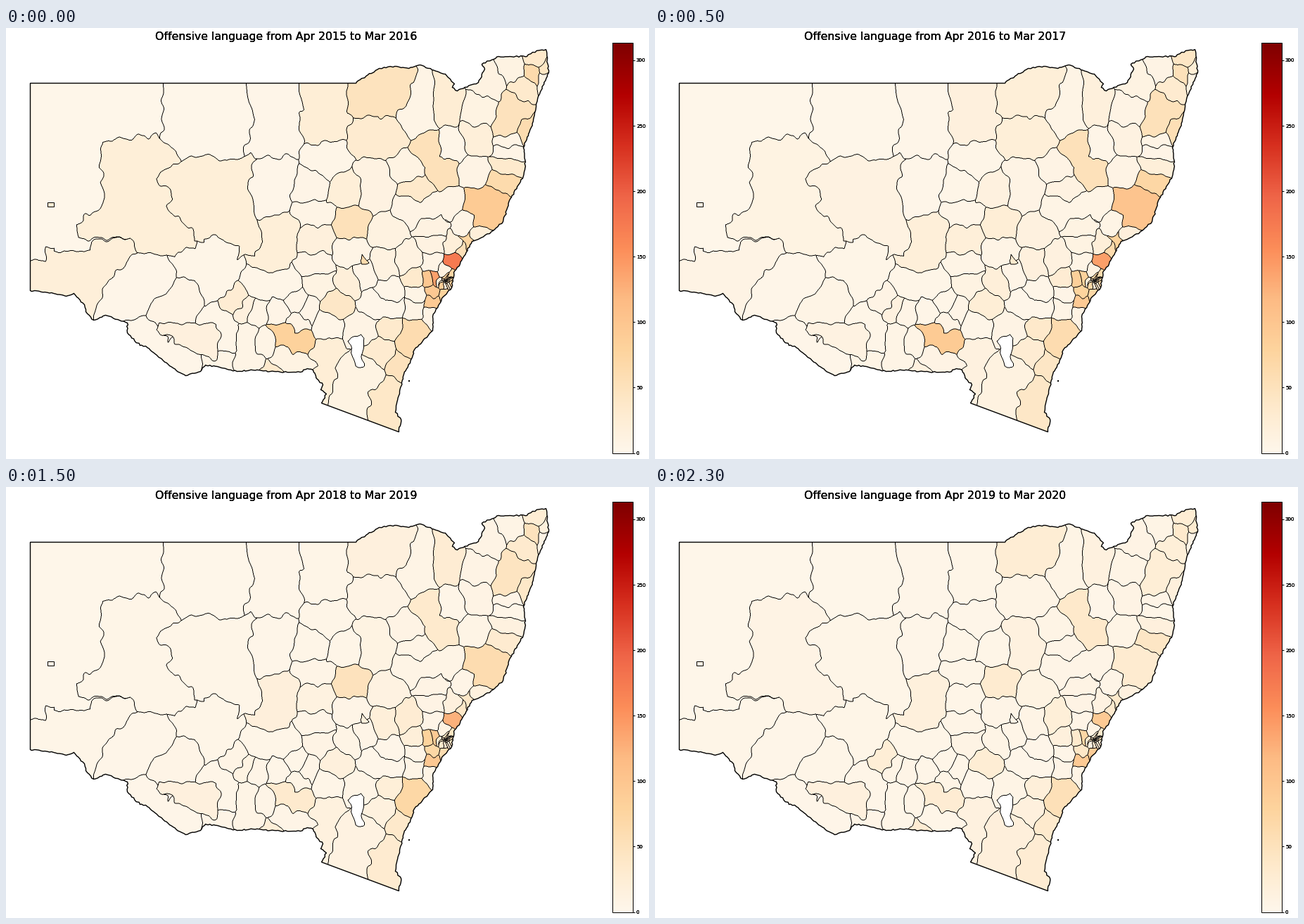
Write a matplotlib script that moves like this. It is 914 px wide and 613 px high and loops after 2.5 s.

```python
import math
import random

import matplotlib.pyplot as plt
import numpy as np
from matplotlib.animation import FuncAnimation
from matplotlib.patches import Polygon, Rectangle
from matplotlib.path import Path

W, H, DPI = 914, 613, 64
PX = 72 / DPI   # points per pixel
SS = 2          # supersampling of the district map
VMAX = 313.4
START, YEARS = 2015, 5
cmap = plt.get_cmap("OrRd")
rng = random.Random(4)

fig = plt.figure(figsize=(W / DPI, H / DPI), dpi=DPI, facecolor="white")
ax = fig.add_axes([0, 0, 1, 1])
ax.axis("off")


def pairs(nums):
    return list(zip(nums[::2], nums[1::2]))


def rough(pts, amp):
    """Chain of points with a fine random wiggle between them."""
    out = [pts[0]]
    for a, b in zip(pts, pts[1:]):
        n = max(1, round(math.dist(a, b) / 3))
        out += [(a[0] + (b[0] - a[0]) * k / n + rng.uniform(-amp, amp),
                 a[1] + (b[1] - a[1]) * k / n + rng.uniform(-amp, amp))
                for k in range(1, n)] + [b]
    return out


def wobble(x, y):
    """Smooth noise made of a few random waves."""
    total = 0
    for _ in range(6):
        length, angle = rng.uniform(9, 30), rng.uniform(0, 2 * math.pi)
        along = x * math.cos(angle) + y * math.sin(angle)
        total = total + .045 * length * np.sin(2 * math.pi * along / length)
    return total


# State outline: coast and rivers wiggle, two surveyed borders are straight
coast = rough(pairs((
    497, 78, 503, 73, 530, 57, 552, 54, 572, 57, 588, 52, 605, 59, 624, 65,
    637, 79, 634, 84, 641, 89, 671, 77, 680, 58, 676, 51, 700, 40, 740, 40,
    748, 34, 767, 30, 771, 63, 756, 97, 749, 132, 735, 170, 738, 190,
    735, 210, 716, 243, 706, 275, 687, 292, 662, 303, 645, 335, 636, 347,
    633, 369, 619, 384, 606, 410, 606, 430, 580, 457, 574, 476, 565, 492,
    558, 522, 553, 546, 561, 556, 558, 574)), .9)
rivers = rough(pairs((
    448, 533, 455, 520, 447, 514, 450, 507, 442, 499, 436, 486, 428, 484,
    418, 489, 390, 489, 350, 486, 328, 488, 300, 481, 283, 479, 276, 488,
    255, 494, 232, 480, 198, 452, 190, 451, 172, 433, 172, 419, 141, 408,
    124, 415, 113, 403, 111, 393, 96, 377, 85, 381, 64, 376, 34, 373)), .9)
outline = [(34, 78)] + coast + rivers

sites, blocks, levels = [], [], []


def add_levels(vals):
    """Spread a few key levels evenly over the years."""
    vals = np.atleast_1d(vals)
    when = np.linspace(0, YEARS - 1, len(vals))
    levels.append(np.interp(range(YEARS), when, vals))
    return len(levels) - 1


def place(vals, *centres):
    """District holding all ground nearest to its centres."""
    k = add_levels(vals)
    sites.extend((x, y, k) for x, y in pairs(centres))


def block(vals, *corners):
    """District with surveyed corners, laid over the others."""
    blocks.append((pairs(corners), add_levels(vals)))


# Outback
place(3, 160, 115, 90, 200, 90, 300)
place(3, 285, 120, 317, 130)
place(4, 385, 110, 383, 152)
place((24, 17, 15, 6, 6), 452, 135, 455, 100)
place(4, 383, 212, 372, 240)
place((22, 19, 18), 390, 290, 375, 325, 385, 310)
place(6, 300, 365, 265, 325, 305, 340)
place(4, 210, 355, 175, 385)
place((9, 6), 252, 388, 235, 405)
place(4, 190, 440, 250, 478)
place(5, 395, 365, 360, 365)
block((20, 9, 7, 6, 6), 34, 331, 55, 331, 57, 312, 68, 312, 68, 318, 120, 318,
      120, 302, 176, 299, 188, 310, 186, 320, 150, 352, 126, 404, 126, 430,
      20, 430, 20, 331)
block((22, 10, 8, 6, 9), 137, 165, 152, 156, 212, 152, 230, 166, 270, 210,
      270, 313, 243, 315, 240, 326, 186, 318, 176, 299, 103, 299, 100, 279,
      141, 250, 134, 218)
block((22, 8, 6, 5), 246, 188, 283, 179, 315, 190, 346, 178, 355, 183,
      344, 229, 366, 303, 353, 322, 330, 326, 330, 310, 303, 296, 279, 296,
      278, 305, 266, 304, 268, 292, 228, 254, 238, 240, 211, 211)
block((16, 12, 24, 16, 16), 217, 418, 302, 421, 298, 470, 278, 467, 213, 430)

# North
place((48, 22, 32, 16, 26), 515, 95, 545, 95)
place((30, 22, 9, 9, 8), 545, 158, 520, 155)
place(8, 595, 110, 585, 130)
place((26, 18, 30, 28, 14), 622, 108)
place((50, 52, 54, 46, 24), 722, 115, 715, 142)
place((34, 30, 32, 32, 22), 738, 80)
place((66, 52, 36, 50, 34), 748, 65)
place((36, 42, 38, 26, 26), 755, 42)
place((44, 24, 30, 18, 30), 765, 56)
place((62, 56, 46, 38, 18), 741, 148)
place((20, 12, 14, 9, 9), 668, 158)
place((34, 20, 18, 14, 16), 715, 196)
place((64, 72, 74, 30, 42), 708, 219)
place((92, 102, 114, 62, 30), 695, 245, 668, 250, 680, 270)
place((52, 52, 48, 34, 36), 600, 170, 622, 205)
place((36, 12, 9, 8, 7), 585, 230)
place((9, 7), 600, 255, 575, 257, 635, 250)

# Centre
place((12, 9, 9, 11, 14), 525, 215, 525, 235)
place((22, 14, 8, 6, 6), 482, 232)
place((52, 24, 34, 50, 30), 490, 275)
place((18, 20, 14, 13, 6), 440, 300)
place((13, 14, 12, 12, 10), 543, 288)
place((20, 20, 12, 8, 8), 488, 360)
place((13, 16, 22, 20, 8), 538, 337)
place((13, 14, 26, 28, 22), 572, 330)
place((40, 24, 16, 18, 26), 470, 392)
place(4, 525, 393, 548, 398)
block((66, 32, 5, 18, 7), 502, 329, 508, 324, 513, 334, 504, 336)

# South
place((28, 9, 8, 8, 24), 324, 388)
place((16, 8), 342, 400)
place(5, 312, 440, 305, 415)
place((8, 9, 6), 345, 465, 340, 440, 340, 478)
place((82, 92, 56, 32, 28), 395, 432, 420, 446)
place((10, 6), 395, 475, 420, 478)
place((34, 14, 14, 22, 28), 381, 492)
place((24, 14, 18, 15, 14), 452, 462, 445, 500)
place((10, 13, 20, 12, 19), 488, 515, 515, 490, 495, 490)
place((30, 28, 15, 15, 16), 535, 460)
place((34, 36, 34, 22, 20), 547, 424)
place((62, 62, 74, 70, 54), 580, 430, 574, 448)
place((50, 42, 34, 36, 34), 560, 480)
place((38, 40, 34, 30, 28), 545, 520)
GAP = len(levels)  # the enclave left white
block(0, 488, 443, 505, 435, 511, 441, 507, 472, 503, 480, 496, 479, 488, 460)

# Around the city
place((20, 20, 16, 16, 12), 635, 308)
place((20, 14), 672, 297)
place((76, 80, 78, 40, 36), 658, 306)
place((54, 64, 62, 38, 32), 650, 314)
place((34, 28, 22, 20, 18), 584, 355)
place((175, 142, 128, 126, 94), 637, 331)
place((98, 84, 78, 80, 34), 600, 357)
place((140, 82, 70, 94, 72), 610, 355)
place((96, 78, 66, 70, 40), 607, 373)
place((80, 70, 54, 62, 90), 622, 376)
place((94, 94, 124, 96, 94), 607, 392)
for _ in range(30):
    place((rng.uniform(20, 95), rng.uniform(15, 60)),
          rng.gauss(627, 4.5), rng.gauss(361, 3))

# Quiet districts, each with one centre
quiet = pairs((
    455, 190, 435, 225, 440, 263, 440, 337, 445, 362, 490, 322, 508, 350,
    686, 75, 720, 58, 672, 117, 765, 70, 718, 160, 718, 178, 633, 168,
    664, 205, 570, 198, 605, 283, 608, 305, 650, 278, 606, 335, 620, 346,
    545, 375, 586, 376, 583, 398, 606, 404, 505, 425, 452, 420, 365, 447,
    390, 405, 355, 405, 412, 393, 426, 403, 415, 418, 307, 478))
for centre in quiet:
    first = rng.uniform(5, 12)
    place((first, first * .8), *centre)

# Label every sample with its district
y, x = (np.mgrid[0:H * SS, 0:W * SS].astype(np.float32) + .5) / SS - .5
u, v = x + wobble(x, y), y + wobble(x, y)
labels = np.zeros(u.shape, int)
best = np.full(u.shape, np.inf, np.float32)
for sx, sy, k in sites:
    dist = (u - sx) ** 2 + (v - sy) ** 2
    closer = dist < best
    best[closer] = dist[closer]
    labels[closer] = k
ground = np.column_stack([u.ravel(), v.ravel()])
for corners, k in blocks:
    inside = Path(corners + corners[:1]).contains_points(ground)
    labels[inside.reshape(labels.shape)] = k

# A sample beside another district belongs to the border line
border = np.zeros(labels.shape, bool)
across = labels[:, 1:] != labels[:, :-1]
down = labels[1:] != labels[:-1]
border[:, 1:] |= across
border[:, :-1] |= across
border[1:] |= down
border[:-1] |= down


def district_map(year):
    shades = cmap(np.array(levels)[:, year] / VMAX)[:, :3]
    shades[GAP] = 1
    rgb = shades[labels]
    rgb[border] = 0
    return rgb.reshape(H, SS, W, SS, 3).mean(axis=(1, 3))


land = Polygon(outline, fill=False, ec="black", lw=1.4 * PX)
ax.add_patch(land)
picture = ax.imshow(np.ones((H, W, 3)), extent=(-.5, W - .5, H - .5, -.5),
                    interpolation="nearest", aspect="auto")
picture.set_clip_path(land)

# A town enclosed by the far west, and a speck off the coast
town = Rectangle((58, 247), 9, 6, ec="black", lw=PX)
ax.add_patch(town)
town_levels = (28, 10, 12, 8, 9)
ax.add_patch(Rectangle((571.5, 500.5), 1.5, 1.5, color="black", lw=0))

# Colour scale
X0, X1, TOP, BASE = 861.9, 890.4, 20.1, 604.1
ax.imshow(np.linspace(1, 0, 256)[:, None], cmap=cmap, aspect="auto",
          extent=(X0, X1, BASE, TOP), interpolation="nearest")
ax.add_patch(Rectangle((X0, TOP), X1 - X0, BASE - TOP, fill=False,
                       ec="black", lw=PX))


def label(x, y, text, size, **kw):
    """Text laid down three times, for a heavier edge."""
    return [ax.text(x, y, text, fontsize=size * PX, family="DejaVu Sans", **kw)
            for _ in range(3)]


for mark in range(0, 301, 50):
    level = BASE - mark / VMAX * (BASE - TOP)
    ax.plot([X1, X1 + 3.5], [level, level], color="black", lw=PX,
            solid_capstyle="butt")
    label(895.5, level + .3, str(mark), 6.9, va="center_baseline")

titles = label(398, 16.5, "", 15.75, ha="center", va="baseline")
ax.set_xlim(-.5, W - .5)
ax.set_ylim(H - .5, -.5)


def update(i):
    year = START + i
    for title in titles:
        title.set_text(f"Offensive language from Apr {year} to Mar {year + 1}")
    picture.set_data(district_map(i))
    town.set_facecolor(cmap(town_levels[i] / VMAX))
    return titles + [picture, town]


anim = FuncAnimation(fig, update, frames=YEARS, interval=500, repeat=True,
                     repeat_delay=0, blit=False)
plt.show()
```
